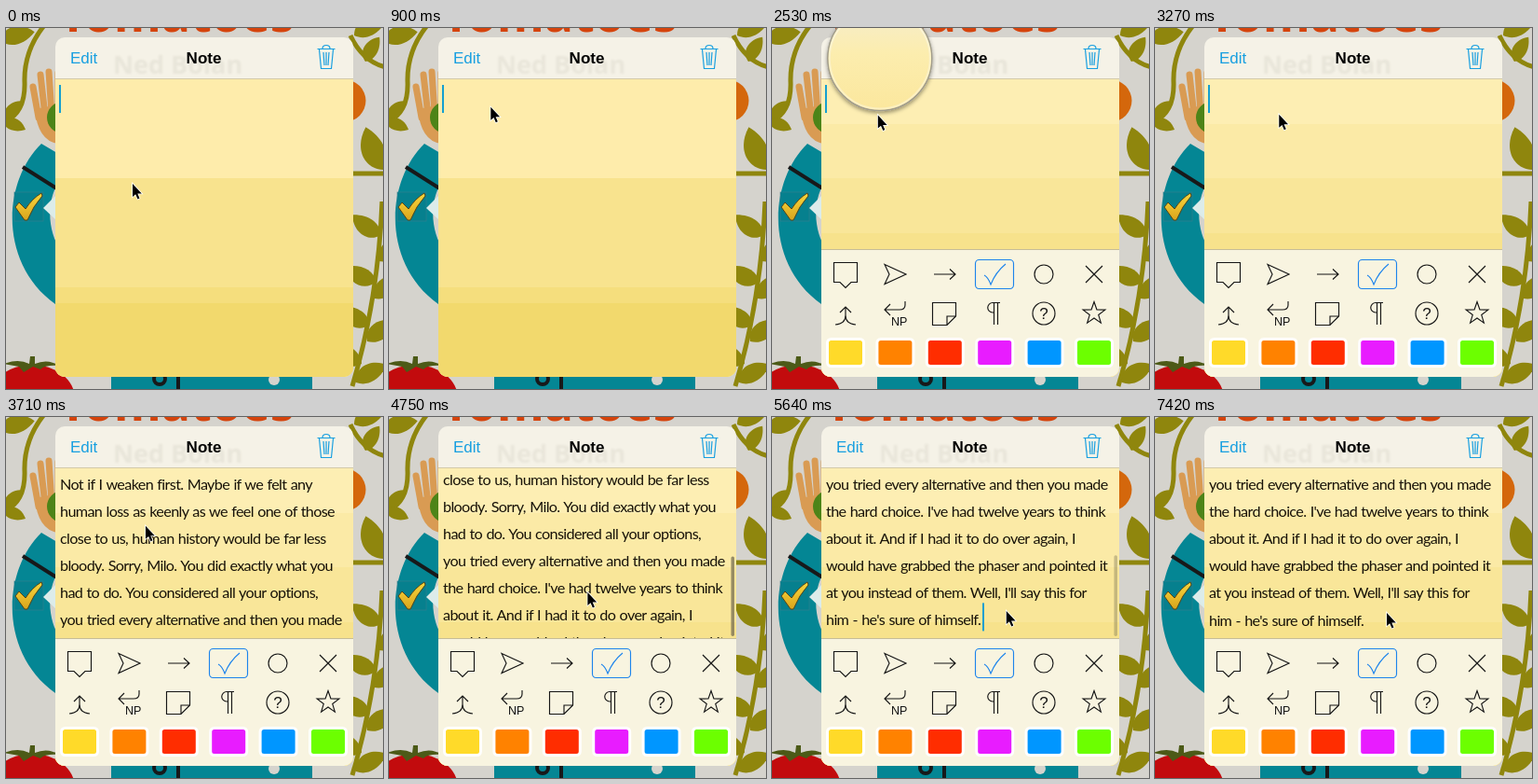
An HTML page that plays this animation: 405x387 px, repeating every 8000 ms.

```html
<!DOCTYPE html>
<html lang="en">
<head>
<meta charset="utf-8">
<title>Note popover</title>
<style>
  html, body { margin: 0; width: 100%; height: 100%; overflow: hidden; background: #d5d3cd; }
  svg { display: block; width: 100%; height: 100%; }
  .ui { font-family: "Liberation Sans", Arial, sans-serif; font-size: 17px; }
  .poster { font-family: "Open Sans", sans-serif; font-weight: 700; }
  #note text { font-family: Lato, sans-serif; font-size: 16.2px; letter-spacing: -.65px; word-spacing: .8px; fill: #171208; }
  .icons { fill: none; stroke: #151515; stroke-width: 1.15; }
  .icons text { fill: #151515; stroke: none; }
</style>
</head>
<body>
<svg viewBox="0 0 405 387">
  <defs>
    <clipPath id="popClip"><rect x="53" y="10" width="320" height="364" rx="10"/></clipPath>
    <clipPath id="paperClip"><rect x="53" y="54.5" width="320" height="183.5"/></clipPath>
    <path id="leaf" d="M0 0C7-15 26-15 38 0C25 10 9 11 0 0Z"/>
    <linearGradient id="lens" x2="0" y2="1">
      <stop offset=".2" stop-color="#f8edc0"/><stop offset=".45" stop-color="#fcedae"/>
      <stop offset="1" stop-color="#fbe79d"/>
    </linearGradient>
    <linearGradient id="gold" x2="0" y2="1">
      <stop stop-color="#f8d63d"/><stop offset="1" stop-color="#d9a51c"/>
    </linearGradient>
    <filter id="soft" x="-20%" y="-40%" width="140%" height="180%"><feGaussianBlur stdDeviation="1.3"/></filter>
    <filter id="shade" x="-20%" y="-20%" width="140%" height="140%">
      <feDropShadow dx="0" dy="2" stdDeviation="2" flood-opacity=".4"/>
    </filter>
  </defs>

  <!-- poster behind the popover -->
  <rect width="405" height="387" fill="#d5d3cd"/>
  <g fill="none" stroke="#8f860d" stroke-width="5">
    <path d="M-3 101Q21 92 20 58T42-4M370 8Q383 36 408 42M370 156H408M404 186Q400 290 372 384"/>
  </g>
  <g id="leaves" fill="#8f860d"></g>
  <text class="poster" x="57" y="4" font-size="52" fill="#d5440d">Tomatoes</text>
  <circle cx="364" cy="78" r="22.5" fill="#d4670c"/>
  <g stroke="#d99b53" stroke-width="7" stroke-linecap="round">
    <path d="M29 63L35 96M37 50L42 94M46 47L49 92M56 48V92"/>
    <path d="M31 87Q34 121 56 124V82Z" fill="#d99b53" stroke="none"/>
  </g>
  <circle cx="61" cy="96" r="17" fill="#4d8418"/>
  <path d="M38 124C-4 165-8 252 53 296H60V240C43 217 43 181 60 160V137Z" fill="#048694"/>
  <path d="M18 149L56 173" stroke="#17191a" stroke-width="4"/>
  <rect x="9" y="176" width="31" height="31" fill="#06808e" stroke="#2f7f8d" stroke-width=".7"/>
  <path d="M10 192L14 187 21 194Q28 183 38 177L39 180Q29 191 23 206H20Z" fill="url(#gold)" stroke="#574617"/>
  <ellipse cx="28" cy="397" rx="46" ry="36" fill="#c20b0d"/>
  <path d="M-2 360Q13 354 25 360L26 352H31V360Q45 354 57 362Q42 361 37 366L29 363 19 369 14 363Z" fill="#4c5a17"/>
  <path d="M113 370H329V388H113Z" fill="#048694"/>
  <g fill="none" stroke="#17191a" stroke-width="4"><circle cx="165" cy="376" r="6"/><path d="M185 370V388"/></g>
  <circle cx="288" cy="377" r="6" fill="#d5d3cd"/>

  <!-- popover -->
  <path d="M54 179L40 193 54 206Z" fill="#dcecea"/>
  <g clip-path="url(#popClip)">
    <g id="plainPaper"></g>
    <g id="bandedPaper"></g>
    <g clip-path="url(#paperClip)">
      <g id="note"></g>
      <rect id="caret" width="2" height="30" fill="#159fd0"/>
      <rect id="scrollbar" x="367.5" width="3.5" rx="1.7" fill="#67614a"/>
    </g>
    <path d="M53 10H373V54H53Z" fill="#f5f2e7"/>
    <text class="poster" x="115" y="49" font-size="27" fill="#77715f" opacity=".09" filter="url(#soft)">Ned Bolan</text>
    <path d="M53 54.5H373" stroke="#d2c9a9"/>
    <g class="ui"><text x="69" y="38" fill="#179fe0">Edit</text>
      <text x="212.5" y="38" text-anchor="middle" font-weight="700">Note</text></g>
    <path d="M334.5 22.5H353.5M340 22Q340 18.500 344 18.500T348 22M336.500 23L338.500 43.500H349.500L351.500 23M341 26L342 40M344 26V40M347 26L346 40" fill="none" stroke="#179fe0" stroke-width="1.2"/>
    <g id="palette">
      <rect x="53" y="238" width="320" height="140" fill="#f8f4e0"/>
      <path d="M53 237.500H373" stroke="#c6bd98"/>
      <g class="icons">
        <path d="M66.500 251.500H91.500V272.500H85L79 278.500 73 272.500H66.500Z"/>
        <path d="M121 253.500L144 264 121 274.500 126 264Z"/>
        <path d="M174 264H197M191 258.500L197 264 191 269.500"/>
        <g stroke="#1c84ec"><rect x="218.500" y="248.500" width="41" height="31" rx="4"/>
          <path d="M228 265Q232 267 235 275Q240 262 251 253"/></g>
        <circle cx="292" cy="264" r="10"/>
        <path d="M337 255L355 273M355 255L337 273"/>
        <path d="M68 318Q79 317 79 308V299M90 318Q79 317 79 308M73 305L79 299 85 305"/>
        <path d="M143 293V297Q143 302 137 302H121M127 296L121 302 127 308"/>
        <text class="ui" x="128" y="319" style="font-size:12.500px">NP</text>
        <path d="M172.500 294.500H197.500V309L188 318.500H172.500ZM197 309H188V318"/>
        <path d="M245 294.500H237A5 5 0 0 0 237 305H238M238.500 294.500V318M242.500 294.500V318"/>
        <circle cx="292" cy="306" r="12"/>
        <text class="ui" x="292" y="312" text-anchor="middle">?</text>
        <path id="star"/>
      </g>
      <g id="swatches" stroke="#fff" stroke-width="3"></g>
    </g>
  </g>
  <g id="magnifier" filter="url(#shade)">
    <circle r="56" fill="url(#lens)" stroke="#a09c8c" stroke-width="1.500"/>
    <circle r="54" fill="none" stroke="#fff" stroke-opacity=".35" stroke-width="2"/>
  </g>
  <path id="pointer" d="M0 0V14L3.200 11.300 5.500 16.500 7.500 15.500 5.300 10.500H9.800Z" stroke="#fff" stroke-width="1.500" paint-order="stroke"/>
</svg>
<script>
const $ = id => document.getElementById(id);
const LOOP = 8000, STEP = 148.3, LINE = 29.05;

// x, y, angle, scale
const leaves = [
  [-6, 14, -15, 1], [0, 100, -55, .7], [-4, 100, 20, .7],
  [374, 8, -25, 1], [386, 36, -60, .8], [405, 152, -112, 1.3],
  [403, 222, 215, 1], [401, 250, -40, 1], [398, 272, 205, 1],
  [396, 290, -40, 1], [391, 318, 210, 1], [388, 336, -35, 1],
  [382, 360, 215, 1], [376, 380, -30, 1]
];
$('leaves').innerHTML = leaves.map(([x, y, angle, size]) =>
  `<use href="#leaf" transform="translate(${x} ${y}) rotate(${angle}) scale(${size})"/>`).join('');

const paper = bands => bands.map(([y, color]) =>
  `<path d="M53 ${y}H373V374H53Z" fill="${color}"/>`).join('');
$('plainPaper').innerHTML = paper([[54, '#feecab'], [161, '#f8e38e'], [278, '#f5de7d'], [295, '#f2d96d']]);
$('bandedPaper').innerHTML = paper([[54, '#fdeeb3'], [103, '#fbeaa6'], [161, '#f9e699'], [220, '#f7e28c']]);

const lines = [
  'Not if I weaken first. Maybe if we felt any',
  'human loss as keenly as we feel one of those',
  'close to us, human history would be far less',
  'bloody. Sorry, Milo. You did exactly what you',
  'had to do. You considered all your options,',
  'you tried every alternative and then you made',
  "the hard choice. I've had twelve years to think",
  'about it. And if I had it to do over again, I',
  'would have grabbed the phaser and pointed it',
  "at you instead of them. Well, I'll say this for",
  "him - he's sure of himself."
];
$('note').innerHTML = lines.map((line, i) => `<text x="58" y="${77.5 + i * LINE}">${line}</text>`).join('');

$('swatches').innerHTML = ['#ffda29', '#ff8200', '#ff2d00', '#e81cff', '#0096ff', '#6cff00'].map((color, i) =>
  `<rect x="${59.5 + i * 53.4}" y="333.500" width="39" height="29" rx="4" fill="${color}"/>`).join('');

$('star').setAttribute('d', 'M' + Array.from({ length: 10 }, (_, i) => {
  const r = i % 2 ? 5 : 12.5, a = i * Math.PI / 5;
  return `${346 + r * Math.sin(a)} ${306 - r * Math.cos(a)}`;
}).join('L') + 'Z');

// Linear interpolation through [time, ...values] keys
function track(keys, t) {
  const next = keys.findIndex(key => key[0] > t);
  if (next === 0) return keys[0].slice(1);
  if (next < 0) return keys.at(-1).slice(1);
  const a = keys[next - 1], b = keys[next], p = (t - a[0]) / (b[0] - a[0]);
  return a.slice(1).map((v, i) => v + (b[i + 1] - v) * p);
}

const pointerKeys = [
  [0, 136, 167], [1050, 104.5, 70], [2080, 104.5, 70], [2530, 114, 94], [2980, 114, 94],
  [3420, 144, 92], [3710, 150, 117], [4450, 205, 180], [5050, 222, 196],
  [5640, 252, 208], [5780, 249, 210]
];
const scrollKeys = [[4600, 0], [4900, 130], [5050, 165], [5340, 152], [5640, 144.5]];
// top edge, opacity
const barKeys = [[4600, 130, 0], [4750, 150, .7], [5050, 167, .7], [5640, 148, .35], [5780, 148, 0]];

const place = (id, x, y, extra = '') => $(id).setAttribute('transform', `translate(${x} ${y})${extra}`);
const show = (id, opacity) => $(id).setAttribute('opacity', opacity);

function draw(time) {
  const t = Math.floor(time % LOOP / STEP) * STEP;
  const [x, y] = track(pointerKeys, t);
  place('pointer', x, y);

  const slide = Math.min(1, Math.max(0, (t - 1200) / 500));
  place('palette', 0, 137 * (1 - slide) ** 3);
  show('bandedPaper', t < 1180 ? 0 : 1);

  const lensOn = t >= 2370 && t < 2820;
  show('magnifier', lensOn ? 1 : 0);
  place('magnifier', x + 2, y - 61, ` scale(${t < 2500 ? .7 : 1})`);

  const pasted = t >= 3550;
  const [scroll] = track(scrollKeys, t);
  show('note', pasted ? 1 : 0);
  place('note', 0, -scroll);
  place('caret', pasted ? 226 : 57, pasted ? 344 - scroll : 61);
  show('caret', track([[5930, 1], [6380, 0]], t)[0]);

  const [top, opacity] = track(barKeys, t);
  $('scrollbar').setAttribute('y', top);
  $('scrollbar').setAttribute('height', 235 - top);
  show('scrollbar', opacity);
}

const start = performance.now();
function tick() {
  draw(performance.now() - start);
  requestAnimationFrame(tick);
}
tick();
</script>
</body>
</html>
```
